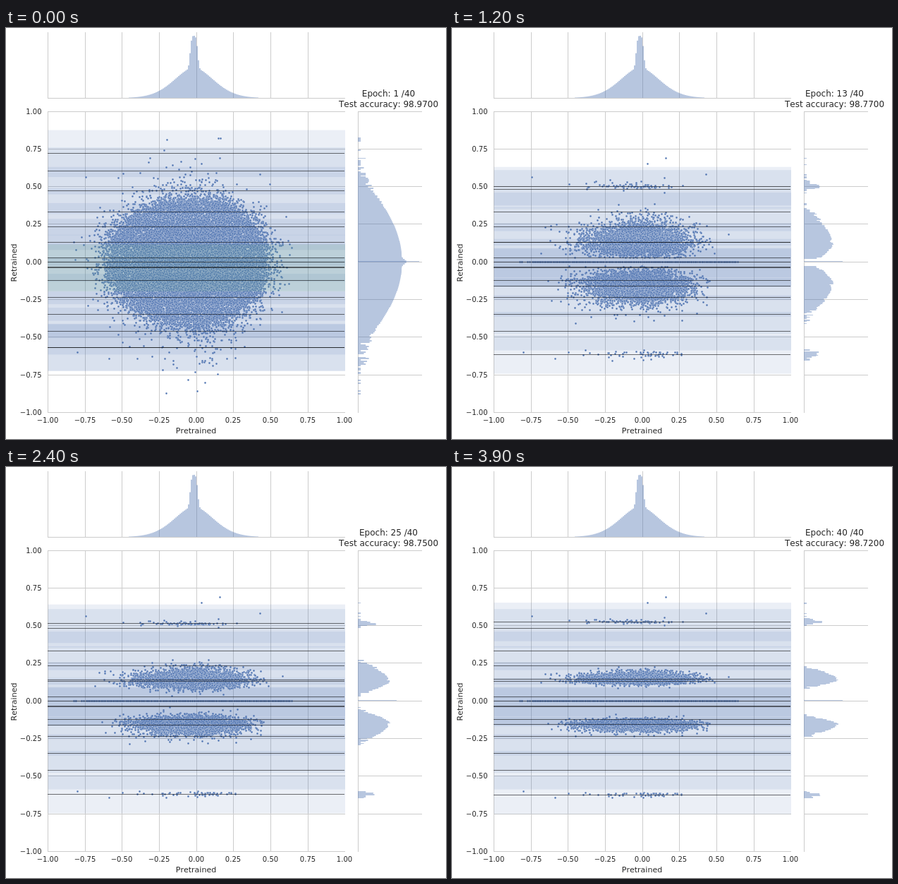
An HTML page with a canvas that plays this animation: 624x582 px, repeating every 4000 ms.

```html
<!DOCTYPE html>
<html lang="en">
<head>
<meta charset="utf-8">
<title>Weights before and after retraining</title>
<style>
  html, body { margin: 0; width: 624px; height: 582px; overflow: hidden; background: #fff; }
  canvas { display: block; }
</style>
</head>
<body>
<canvas id="stage" width="624" height="582"></canvas>
<script>
const ctx = document.getElementById('stage').getContext('2d');
const BLUE = '#4c72b0', GREEN = '#55a868', GRID = '#ccc', TEXT = '#262626';
const EPOCHS = 40, EPOCH_MS = 100, SETTLED = 9;
const px = x => 59.5 + (x + 1) * 210.6;
const py = y => 331.25 - y * 213.1;

// Progress of the fast settling phase, then of the slow drift after it.
const settle = e => Math.min(1, (e - 1) / (SETTLED - 1));
const late = e => Math.max(0, (e - SETTLED) / (EPOCHS - SETTLED));
const decay = (e, first, last, tau) => last + (first - last) * Math.exp(-(e - 1) / tau);

let seed = 7;
function random() {
  seed = (seed + 0x6d2b79f5) | 0;
  let t = Math.imul(seed ^ (seed >>> 15), 1 | seed);
  t = (t + Math.imul(t ^ (t >>> 7), 61 | t)) ^ t;
  return ((t ^ (t >>> 14)) >>> 0) / 4294967296;
}
const logRandom = () => -Math.log(1 - random());
const list = (n, make) => Array.from({ length: n }, make);

// A point at radius r (in sigmas) in a random direction, slightly wider to the left.
function polar(r) {
  const a = 2 * Math.PI * random(), c = r * Math.cos(a);
  return { x: c * (c < 0 ? .18 : .148) - .01, v: r * Math.sin(a) };
}

// The large Gaussian blob: a saturated core plus the true tail beyond CORE sigmas.
const WEIGHTS = 3e5, CORE = 2.9;
const blobSigma = e => .13 * (1 - settle(e)) ** 1.1;
const blob = [
  ...list(12000, () => polar(CORE * Math.sqrt(random()))),
  ...list(WEIGHTS * Math.exp(-CORE * CORE / 2), () => polar(Math.sqrt(CORE * CORE + 2 * logRandom())))
];

// Clusters travel from start to home, swinging out on the way, and tighten.
function cluster(n, start, home, drift, swing, spread, gap = 0) {
  const points = list(n, () => ({
    x: polar(Math.sqrt(2 * logRandom())).x,
    v: logRandom() ** .75 * (random() < .5 ? -.7 : 1)
  }));
  return { points, start, home, drift, swing, spread, gap };
}
const tighten = e => decay(e, .122, .012, 13);
const tightenFew = e => decay(e, .1, .008, 5);
const clusters = [
  cluster(4800, 0, .13, .015, .1, tighten, .025),
  cluster(4800, 0, -.15, -.007, -.25, tighten, .03),
  cluster(75, .5, .5, .025, 0, tightenFew),
  cluster(60, -.614, -.614, -.01, 0, tightenFew),
  cluster(60, 0, 0, 0, 0, e => .3 * (1 - settle(e)))
];
const strays = [[-.745, .56], [.16, .69], [.035, .65], [.43, .58], [-.8, -.6], [-.585, -.645]];

function pointsAt(e) {
  const s = settle(e), sigma = blobSigma(e);
  const out = blob.map(p => [p.x, p.v * sigma]);
  for (const c of clusters) {
    const mid = c.start + (c.home - c.start) * s + c.swing * Math.sin(Math.PI * s) + c.drift * late(e);
    const outward = (Math.sign(c.home) || 1) * c.spread(e);
    for (const p of c.points) {
      const y = mid + p.v * outward;
      if (s < 1 || y * Math.sign(mid) >= c.gap) out.push([p.x, y]);
    }
  }
  return out.concat(strays);
}

// Mixture components; the moving ones go from one mean to another, then drift.
const still = mean => ({ mean: () => mean, width: () => 1 });
const moving = (from, to, drift, power, narrows) => ({
  mean: e => from + (to - from) * settle(e) ** power + drift * late(e),
  width: e => narrows ? 1 - settle(e) ** 4 : 1
});
const components = [
  ...[.333, .235, .13, .0247, -.035, -.125, -.235, -.35, -.46].map(still),
  { ...still(-.04), early: GREEN },
  { mean: () => 0, width: () => 0 },
  moving(.475, .4825, 0, .2),
  moving(.72, .5, .025, 2.2),
  moving(-.57, -.614, -.01, 4),
  moving(.605, .13, .015, .8, true),
  moving(-.567, -.16, .003, .8, true)
];

const dot = document.createElement('canvas');
dot.width = dot.height = 5;
const dotCtx = dot.getContext('2d');
dotCtx.arc(2.5, 2.5, 1.4, 0, 7);
dotCtx.fillStyle = BLUE;
dotCtx.fill();
dotCtx.strokeStyle = '#fff';
dotCtx.lineWidth = .4;
dotCtx.stroke();

function rect(color, x, y, w, h, alpha = 1) {
  ctx.globalAlpha = alpha;
  ctx.fillStyle = color;
  ctx.fillRect(x, y, w, h);
  ctx.globalAlpha = 1;
}
function text(string, x, y, size, align = 'center') {
  ctx.font = `${size}px "DejaVu Sans", sans-serif`;
  ctx.fontKerning = 'none';
  ctx.textAlign = align;
  ctx.fillStyle = TEXT;
  ctx.fillText(string, x, y);
}

function drawAxes() {
  for (let i = 0; i <= 8; i++) {
    const v = i / 4 - 1, x = Math.floor(px(v)), y = Math.floor(py(v));
    if (i < 8) {
      rect(GRID, x, 6, 1, 94);
      rect(GRID, x, 118, 1, 427);
    }
    rect(GRID, 59, y, 422, 1);
    if (i > 0) rect(GRID, 499, y, 91, 1);
    const label = v.toFixed(2).replace('-', '\u2212');
    text(label, x, 559, 10);
    text(label, 50.5, y + 4, 10, 'right');
  }
  rect(GRID, 59, 99, 422, 1);
  rect(GRID, 499, 118, 1, 427);
  text('Pretrained', 269.5, 574, 11);
  ctx.save();
  ctx.translate(15, 332.5);
  ctx.rotate(-Math.PI / 2);
  text('Retrained', 0, 0, 11);
  ctx.restore();
}

function drawTopHistogram() {
  for (let x = 160; x < 390; x += 2) {
    const d = Math.abs(x + 1 - 266.5);
    const h = 43 * Math.exp(-((d / 40) ** 1.8)) + 45 * Math.exp(-((d / 6) ** 3.5));
    if (h > .5) rect(BLUE, x, 99 - h, 2, h, .4);
  }
}

// Log-scaled counts, with the pile-up at zero as one thin bar.
function drawSideHistogram(e, points) {
  const range = decay(e, .9, .68, 5), bins = 200, step = 2 * range / bins;
  const s = settle(e), sigma = blobSigma(e), counts = new Array(bins).fill(0);
  for (const [, y] of points) if (y) counts[Math.floor((y + range) / step)]++;
  for (let i = 0; i < bins; i++) {
    const y = -range + (i + .5) * step;
    const expected = sigma && WEIGHTS * step / (sigma * 2.507) * Math.exp(-y * y / (2 * sigma * sigma));
    const n = Math.round(Math.max(counts[i], expected));
    if (!n) continue;
    const bump = s < 1 ? 7 * Math.exp(-((y / .02) ** 2)) : 0;
    const top = Math.round(py(y + step / 2)), bottom = Math.round(py(y - step / 2));
    rect(BLUE, 499, top, Math.min(62, 4 + 15 * Math.log10(n)) + bump, bottom - top, .4);
  }
  rect(BLUE, 499, 330, 87 - 32 * s ** 3, 1, .4);
}

function drawComponents(e) {
  const s = settle(e), half = .128 + .028 * (1 - s) ** 4;
  for (const c of components) {
    const m = c.mean(e), w = half * c.width(e);
    rect(s < .75 && c.early || BLUE, 59.5, py(m + w), 421.5, py(m - w) - py(m + w), .11);
  }
  for (const c of components) rect('#000', 59, Math.floor(py(c.mean(e))), 421, 1, .55);
}

// Test accuracy at a few epochs, linear in between.
const ACCURACY = [[1, 98.97], [4, 98.99], [9, 98.57], [13, 98.77], [21, 98.77], [29, 98.74], [40, 98.72]];
function accuracy(e) {
  const i = ACCURACY.findIndex(([epoch], k) => k > 0 && epoch >= e);
  const [e0, a0] = ACCURACY[i - 1], [e1, a1] = ACCURACY[i];
  return a0 + (a1 - a0) * (e - e0) / (e1 - e0);
}

function draw(e) {
  rect('#fff', 0, 0, 624, 582);
  drawAxes();
  drawTopHistogram();
  const points = pointsAt(e);
  for (const [x, y] of points) ctx.drawImage(dot, Math.floor(px(x)) - 2, Math.floor(py(y)) - 2);
  drawComponents(e);
  drawSideHistogram(e, points);
  text(`Epoch: ${e} /${EPOCHS}`, 542.5, 97, 12);
  text(`Test accuracy: ${accuracy(e).toFixed(2)}00`, 542.5, 112, 12);
}

let shown = 0;
function tick() {
  const epoch = Math.floor(performance.now() / EPOCH_MS) % EPOCHS + 1;
  if (epoch !== shown) draw(shown = epoch);
  requestAnimationFrame(tick);
}
tick();
</script>
</body>
</html>
```
